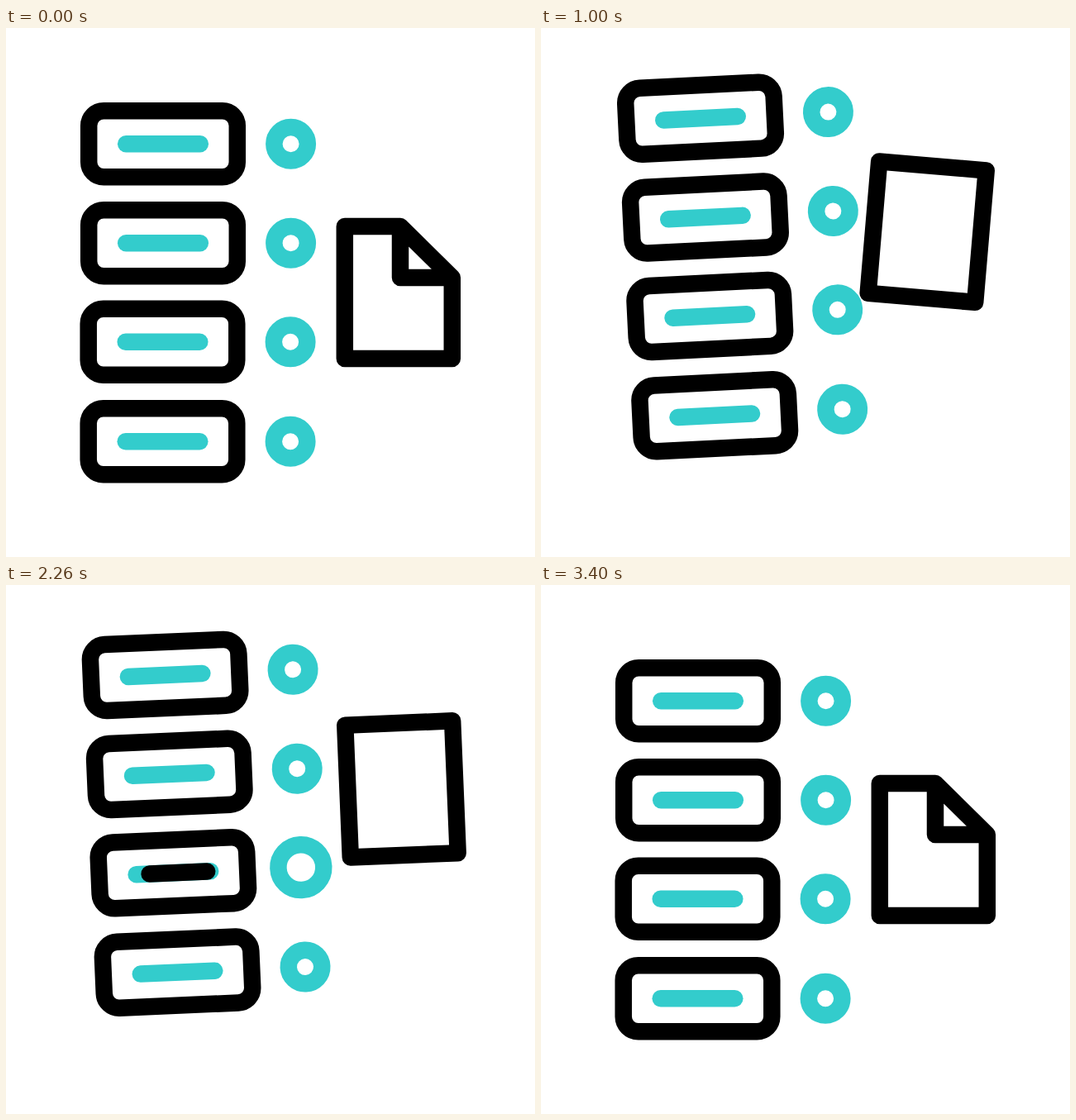
Recreate the animation shown at these times as an HTML page. Size 640 by 640 pixels, loop 3.6 s.

```html
<!DOCTYPE html>
<html lang="en">
<head>
<meta charset="utf-8">
<title>Servers and document</title>
<style>
  html, body { margin: 0; width: 100%; height: 100%; overflow: hidden; background: #fff; }
  svg { display: block; width: 100%; height: 100%; }
  svg * { fill: none; stroke-width: 20.5; stroke-linecap: round; stroke-linejoin: round; }
  .dark { stroke: #000; }
  .teal { stroke: #3cc; }
  .wide { stroke-width: 23; }
</style>
</head>
<body>
<svg viewBox="0 0 640 640">
  <g id="rack"></g>
  <path id="doc" class="dark"/>
</svg>
<script>
const LOOP = 3600, STEP = 20, ROW_DELAY = 810;
const LEFT = 145.2, RIGHT = 234.8;
const rack = document.getElementById('rack');
const doc = document.getElementById('doc');

const mix = (a, b, u) => a + (b - a) * u;
const smooth = u => u * u * (3 - 2 * u);
const ramp = (t, a, b) => Math.min(1, Math.max(0, (t - a) / (b - a)));
const ease = (t, a, b) => smooth(ramp(t, a, b));
const within = (t, a, b) => t >= a && t < b;

// Eases 0 to 1 over a..b, holds, then back to 0 over c..d.
const pulse = (t, a, b, c, d) => ease(t, a, b) - ease(t, c, d);

// Eased swing between +amp and -amp: first peak at t0, one peak per step.
function swing(t, t0, step, amp, count) {
  const peak = i => i < 0 || i >= count ? 0 : i % 2 ? -amp : amp;
  const k = (t - t0) / step, i = Math.floor(k);
  return mix(peak(i), peak(i + 1), smooth(k - i));
}

function add(parent, tag, attrs) {
  const el = document.createElementNS('http://www.w3.org/2000/svg', tag);
  for (const k in attrs) el.setAttribute(k, attrs[k]);
  return parent.appendChild(el);
}

const rows = [140.2, 260.2, 379.7, 500.2].map((y, i) => {
  const g = add(rack, 'g', { transform: `translate(${i > 1 ? -0.5 : 0} ${y})` });
  const box = add(g, 'rect', { x: 100.2, y: -40, width: 179.6, height: 80, rx: 18 });
  add(g, 'path', { d: `M${LEFT} 0H${RIGHT}`, class: 'teal' });
  const sweep = add(g, 'path', { class: 'dark' });
  const ring = add(g, 'circle', { cx: 344.6, cy: 0, class: 'teal' });
  return { box, sweep, ring };
});

function drawRow({ box, sweep, ring }, t) {
  const lit = within(t, 260, 580) || within(t, 800, 950);
  box.setAttribute('class', lit ? 'teal wide' : 'dark');
  ring.setAttribute('r', 20.25 + 7.2 * pulse(t, 220, 400, 640, 820));

  const head = 1 - (1 - ramp(t, 213, 753)) ** 2;
  const tail = ease(t, 570, 830);
  sweep.setAttribute('visibility', within(t, 221, 830) ? 'visible' : 'hidden');
  sweep.setAttribute('d', `M${mix(LEFT, RIGHT, tail)} 0H${mix(LEFT, RIGHT, head)}`);
}

function drawRack(t) {
  const lift = -33 * pulse(t, 220, 740, 2860, 3400);
  const turn = swing(t, 1080, 540, -3, 4);
  rack.setAttribute('transform', `translate(0 ${lift}) rotate(${turn} 232.5 80)`);
  rows.forEach((row, i) => drawRow(row, t - i * ROW_DELAY));
}

function drawDoc(t) {
  const rise = ramp(t, 540, 718) ** 2;
  const lift = -73 * (rise - ease(t, 2880, 3400));
  const sway = t < 718 ? 5 * rise : swing(t, 718, 136, 5, 17);
  const turn = sway - 26 * pulse(t, 3030, 3200, 3200, 3400);
  doc.setAttribute('transform', `translate(0 ${lift}) rotate(${turn} 475 230)`);

  // The folded corner slides out to a square one.
  const u = pulse(t, 220, 540, 3080, 3400);
  const x = mix(477, 539.8, u), y = mix(302, 240, u);
  doc.setAttribute('d',
    `M409.8 240H${x}L539.8 ${y}V400H409.8ZM${x} 240V${y}H539.8`);
}

const start = performance.now();
function tick() {
  const t = Math.floor((performance.now() - start) % LOOP / STEP) * STEP;
  drawRack(t);
  drawDoc(t);
  requestAnimationFrame(tick);
}
tick();
</script>
</body>
</html>
```
